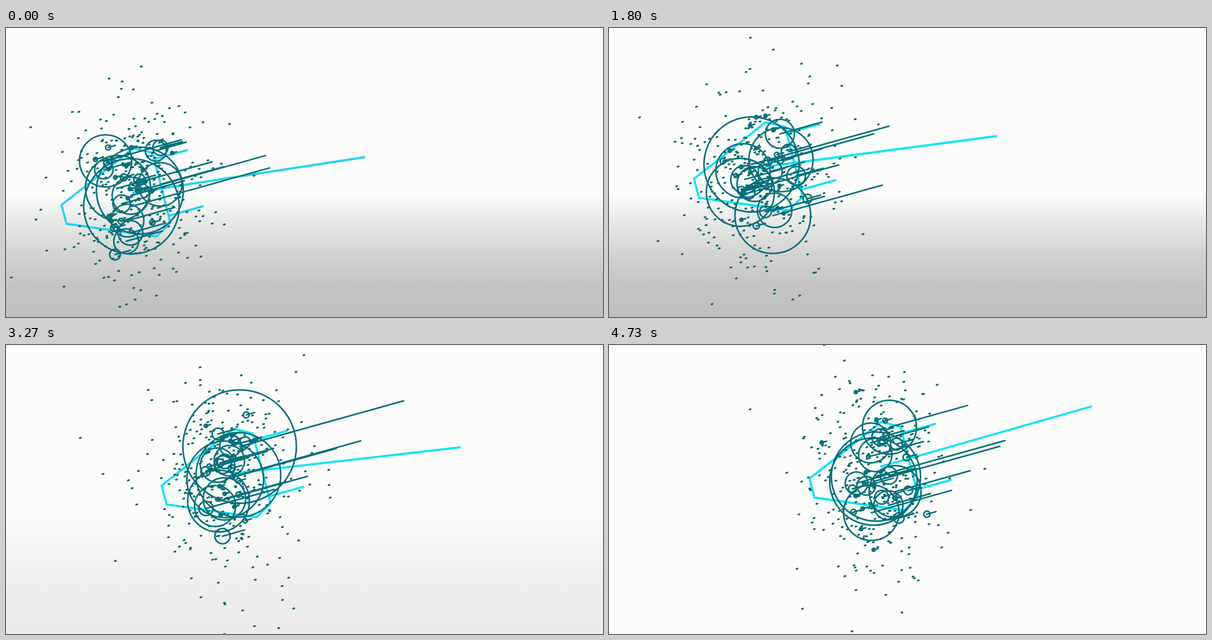
An HTML page with a canvas for the animation above (4790 ms loop, 1075 by 521 pixels).

```html
<!DOCTYPE html>
<html lang="en">
<head>
<meta charset="utf-8">
<title>Particle swarm</title>
<style>
  html, body { margin: 0; width: 100%; height: 100%; overflow: hidden; background: #fcfcfb; }
  canvas { display: block; width: 1075px; height: 521px; }
</style>
</head>
<body>
<canvas id="stage" width="1075" height="521"></canvas>
<script>
const W = 1075, H = 521, LOOP = 4790, STEP = 200 / 3, LAST = 71, HOLD = 8;
const RINGS = 38, DOTS = 330, TILT = -0.272;
const ctx = document.getElementById('stage').getContext('2d');

// step, body x, y, pointer tip x, y
const PATH = [
  [HOLD, 229, 297, 645, 233],
  [12, 236, 287, 655, 222],
  [27, 282, 250, 697, 195],
  [40, 285, 248, 700, 193],
  [43, 375, 235, 769, 196],
  [53, 432, 229, 849, 177],
  [62, 457, 234, 875, 186],
  [66, 471, 229, 886, 172],
  [LAST, 490, 219, 868, 111]
];
const HULL = [[0, -80], [-129, 22], [-120, 56], [42, 79], [67, 54], [35, -72]];
const ARMS = [[37, -60], [66, 41]];

const clamp = v => Math.max(0, Math.min(1, v));

function poseAt(k) {
  const i = Math.max(1, PATH.findIndex(p => p[0] >= k));
  const a = PATH[i - 1], b = PATH[i];
  const p = clamp((k - a[0]) / (b[0] - a[0]));
  return a.map((v, n) => v + (b[n] - v) * p).slice(1);
}

function seeded(seed) {
  let s = (seed + 1) * 7919;
  return () => {
    s = s + 0x6D2B79F5 | 0;
    let t = Math.imul(s ^ s >>> 15, 1 | s);
    t = t + Math.imul(t ^ t >>> 7, 61 | t) ^ t;
    return ((t ^ t >>> 14) >>> 0) / 4294967296;
  };
}

function drawBackground(k) {
  ctx.fillStyle = '#fcfcfb';
  ctx.fillRect(0, 0, W, H);
  // The shade fades to a faint rest, then cuts out
  const shade = k < 55 ? 1 - 0.72 * clamp((k - 40) / 3) : 0;
  const g = ctx.createLinearGradient(0, 298, 0, H);
  for (let i = 0; i <= 4; i++) {
    const p = i / 4;
    g.addColorStop(p, `rgba(0,0,0,${0.245 * Math.sin(p * Math.PI / 2) ** 1.1 * shade})`);
  }
  ctx.fillStyle = g;
  ctx.fillRect(0, 298, W, H - 298);
}

function heading(x, y, length) {
  ctx.moveTo(x, y);
  ctx.lineTo(x + Math.cos(TILT) * length, y + Math.sin(TILT) * length);
}

function drawBody(k, [x, y, tipX, tipY]) {
  ctx.strokeStyle = k <= HOLD ? '#22d3f5' : '#00e5fc';
  ctx.lineWidth = 3.8;
  ctx.beginPath();
  HULL.forEach(([dx, dy]) => ctx.lineTo(x + dx, y + dy));
  ctx.closePath();
  ARMS.forEach(([dx, dy]) => heading(x + dx, y + dy, 62));
  ctx.moveTo(x, y);
  ctx.lineTo(tipX, tipY);
  ctx.stroke();
}

function drawSwarm(k, [x, y]) {
  const rand = seeded(Math.max(k, HOLD));
  const gauss = () =>
    Math.sqrt(-2 * Math.log(1 - rand())) * Math.cos(rand() * Math.PI * 2);

  // Dots trail behind the body
  const [oldX, oldY] = poseAt(k - 4);
  const midX = x + (oldX - x) * 0.65, midY = y + (oldY - y) * 0.65;
  ctx.strokeStyle = '#076a66';
  ctx.lineWidth = 3.2;
  ctx.beginPath();
  for (let i = 0; i < DOTS; i++) {
    const spread = 0.7 + rand() * 0.55;
    heading(midX + gauss() * 70 * spread, midY + 6 + gauss() * 92 * spread, 1.8);
  }
  ctx.stroke();

  // Ring sizes fall off steeply; large ones keep near the middle
  ctx.strokeStyle = '#00707a';
  ctx.lineWidth = 2.8;
  ctx.beginPath();
  for (let i = 0; i < RINGS; i++) {
    const r = 2.5 + 85 * Math.exp(-i / 5.5) * (0.8 + rand() * 0.4);
    const px = x - 8 + gauss() * (32 - r * 0.22);
    const py = y + 6 + gauss() * (62 - r * 0.45);
    ctx.moveTo(px + r, py);
    ctx.arc(px, py, r, 0, Math.PI * 2);
    heading(px, py, r * 3);
  }
  ctx.stroke();
}

function draw(k) {
  const pose = poseAt(k);
  drawBackground(k);
  drawBody(k, pose);
  drawSwarm(k, pose);
}

ctx.lineCap = ctx.lineJoin = 'round';
const start = performance.now();
let shown = -1;
function tick(now) {
  const t = Math.max(0, now - start) % LOOP;
  const k = Math.min(LAST, Math.floor((t + 3.5) / STEP));
  if (k !== shown) draw(shown = k);
  requestAnimationFrame(tick);
}
tick(start);
</script>
</body>
</html>
```
